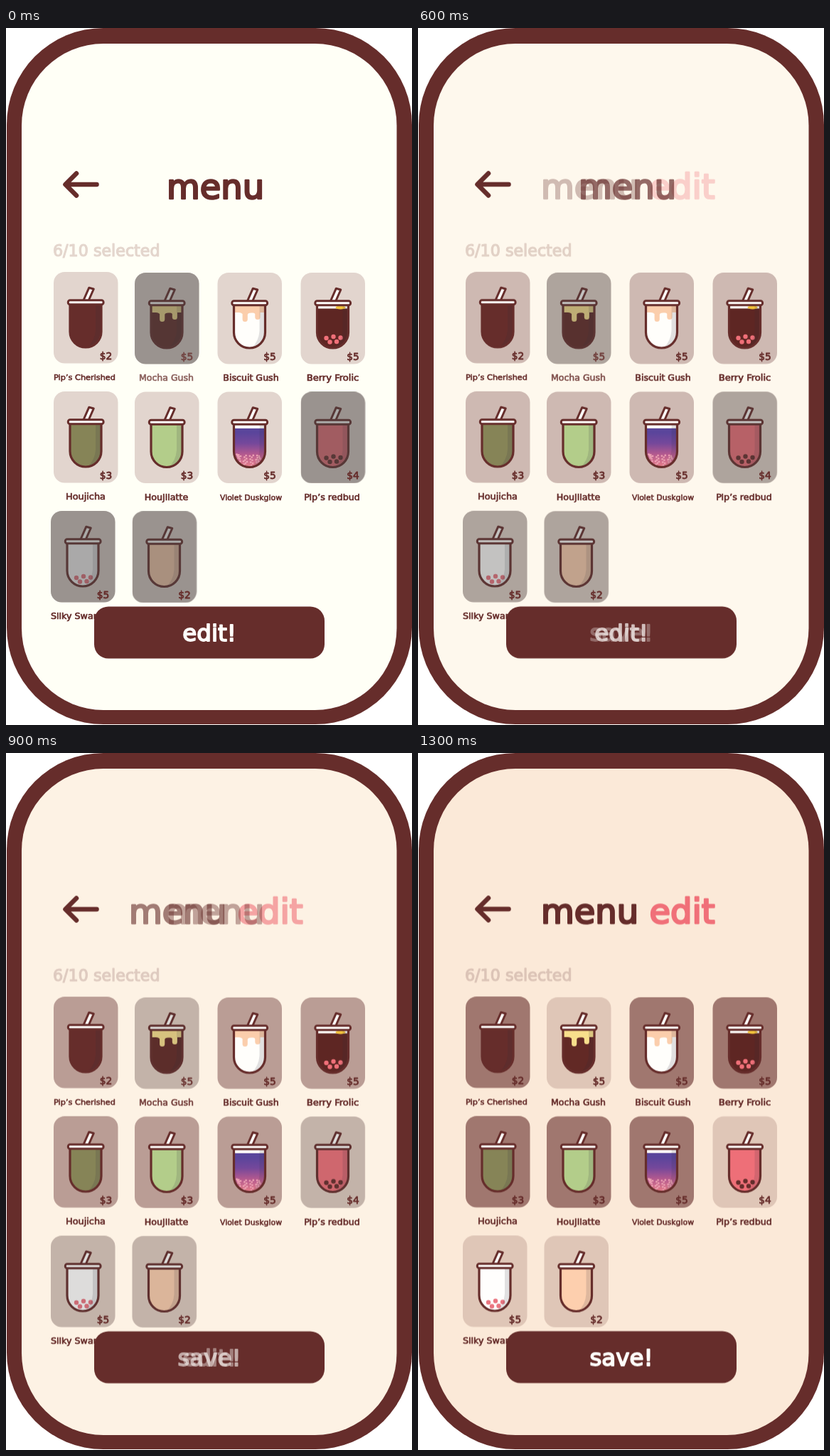
An HTML page for the animation above (1700 ms loop, 571 px wide and 980 px high).

```html
<!DOCTYPE html>
<html lang="en">
<head>
<meta charset="utf-8">
<title>Menu edit mode</title>
<style>
  html, body { margin: 0; width: 100%; height: 100%; overflow: hidden; background: #fff; }
  svg { display: block; width: 100%; height: 100%; color: #662d2b; }
  text, tspan {
    font-family: "DejaVu Sans", sans-serif;
    fill: currentColor;
    stroke: currentColor;
    stroke-width: .055em;
    stroke-linejoin: round;
  }
  .mid { text-anchor: middle; }
  .end { text-anchor: end; }
  .line { fill: none; stroke: #662d2b; stroke-linecap: round; stroke-linejoin: round; }
</style>
</head>
<body>
<svg id="stage" viewBox="0 0 571 980" preserveAspectRatio="none"></svg>
<script>
const BROWN = '#662d2b', PINK = '#f07079', WHITE = '#fffdfa';
const LOOP = 1700, FADE_START = 300, FADE_END = 1300;
const CUP = 'M23 45V84a22 22 0 0 0 44 0V45z';

const circles = (points, r, fill) =>
  points.map(([x, y]) => `<circle cx="${x}" cy="${y}" r="${r}" fill="${fill}"/>`).join('');

const pearls = (fill, dy = 0) =>
  circles([[36, 92], [46, 90], [56, 91.5], [41, 97.5], [50.5, 97]].map(([x, y]) => [x, y + dy]), 3.2, fill);

const drip = fill =>
  `<path fill="${fill}" d="M23 45H67V56H60V62.5a3.6 3.6 0 0 1 -7.2 0V58Q52 56 49 56.5
    Q42.5 56 42.3 59V65.5a3.6 3.6 0 0 1 -7.2 0V58Q33 56 30 56H23z"/>`;

const topBand = h => `<rect x="23" y="45" width="44" height="${h}" fill="${WHITE}"/>`;

const sparkle = () => circles(Array.from({ length: 34 }, (_, i) => {
  const u = (i * .7549 % 1) * 2 - 1;
  const floor = 85 + Math.sqrt(1 - u * u) * 19;
  return [45 + u * 18, 88 + (i * .5698 % 1) * (floor - 88)].map(v => +v.toFixed(1));
}), 1.3, '#eda3b4');

// x, y, price, label, label size, label centre, selected, cup colour, cup contents
const drinks = [
  [67, 343, 2, 'Pip’s Cherished', 11.3, 43.5, true, BROWN, ''],
  [181, 344, 5, 'Mocha Gush', 12.5, 44.5, false, '#622925', drip('#f8df8c')],
  [297.5, 344, 5, 'Biscuit Gush', 12.6, 47, true, '#fffefb', drip('#fbceac')],
  [414.5, 344, 5, 'Berry Frolic', 13.1, 45, true, '#5e2623',
    topBand(5.5) + '<ellipse cx="56" cy="49" rx="7" ry="2.6" fill="#f4c43c"/>' + pearls(PINK)],
  [67, 511, 3, 'Houjicha', 12.9, 45, true, '#868457', ''],
  [181, 511.5, 3, 'Houjilatte', 12.7, 44.5, true, '#b3cd8a', ''],
  [297.5, 511.5, 5, 'Violet Duskglow', 10.9, 47, true, 'url(#dusk)', topBand(6.5) + sparkle()],
  [414.5, 511.5, 4, 'Pip’s redbud', 12.7, 44, false, '#ee6f78', pearls(BROWN, 1)],
  [63, 679, 5, 'Silky Swan', 12.7, 0, false, '#fffefd', pearls('#ea7580', 2)],
  [177.5, 679.5, 2, '', 13, 45, false, '#fdcfae', '']
];

function drinkCard([x, y, price, label, size, centre, selected, colour, contents], i) {
  const card = '<rect width="90.5" height="128.5" rx="15.5"';
  const dimText = i === 1 ? 'data-fade=".75 1"' : '';
  return `<g transform="translate(${x} ${y})">
    ${card} data-fill="#e2d5ce ${selected ? '#a0776f' : '#dfc6b7'}"/>
    <path class="line" d="M41.5 41L49.8 22.2L56.3 24L48.8 41z" style="fill:${WHITE}" stroke-width="3"/>
    <path d="${CUP}" fill="${colour}"/>
    <g clip-path="url(#cup)">${contents}
      <path d="M59 45V82Q58 97 47 107H67V45z" fill="#302c38" opacity=".14"/></g>
    <path class="line" d="${CUP}" stroke-width="3.2"/>
    <rect x="20.3" y="39.8" width="49.8" height="6" rx="2.8" fill="${WHITE}" stroke="${BROWN}" stroke-width="3"/>
    ${selected ? '' : `${card} fill="#464646" data-fade=".46 0"/>`}
    <text class="end" x="82.3" y="122.5" font-size="13.8" ${dimText}>$${price}</text>
    <text class="${centre ? 'mid' : ''}" x="${centre}" y="152" font-size="${size}" ${dimText}>${label}</text>
  </g>`;
}

const stage = document.getElementById('stage');
stage.innerHTML = `
  <defs>
    <clipPath id="cup"><path d="${CUP}"/></clipPath>
    <linearGradient id="dusk" x1="0" y1="0" x2="0" y2="1">
      <stop offset=".2" stop-color="#5a459b"/>
      <stop offset=".45" stop-color="#75489b"/>
      <stop offset=".7" stop-color="#b3598f"/>
      <stop offset="1" stop-color="#e8808a"/>
    </linearGradient>
  </defs>
  <rect x="1" width="570" height="979" rx="136" fill="${BROWN}"/>
  <rect x="22" y="22" width="527.5" height="937" rx="115" data-fill="#fffff6 #fbe9d8"/>
  <g id="content">
    <path class="line" stroke-width="6.6" d="M127.5 220H84M99 204.5L83.5 220L99 235.5"/>
    <text x="173" y="240" font-size="48" data-fade="0 1">menu <tspan style="color:${PINK}">edit</tspan></text>
    <text x="226" y="240" font-size="48" data-fade="1 0">menu</text>
    <text x="66" y="320.5" font-size="22.2" data-color="#e4d6cd #dcc4b7">6/10 selected</text>
    ${drinks.map(drinkCard).join('')}
    <rect x="124" y="813.5" width="324" height="73" rx="20" fill="${BROWN}"/>
    <g style="color:${WHITE}" class="mid" font-size="32.5">
      <text x="286" y="862" data-fade="1 0">edit!</text>
      <text x="286" y="862" data-fade="0 1">save!</text>
    </g>
  </g>`;

// Ten equal steps between two held poses.
function dissolve(el, property, from, to) {
  const key = (value, time, easing = 'linear') => ({ [property]: value, offset: time / LOOP, easing });
  el.animate([
    key(from, 0),
    key(from, FADE_START, 'steps(10, end)'),
    key(to, FADE_END),
    key(to, LOOP)
  ], { duration: LOOP, iterations: Infinity });
}

for (const [name, property] of [['fade', 'opacity'], ['fill', 'fill'], ['color', 'color']]) {
  for (const el of stage.querySelectorAll(`[data-${name}]`)) {
    dissolve(el, property, ...el.dataset[name].split(' '));
  }
}
dissolve(document.getElementById('content'), 'transform', 'translateY(0px)', 'translateY(-0.6px)');
</script>
</body>
</html>
```
